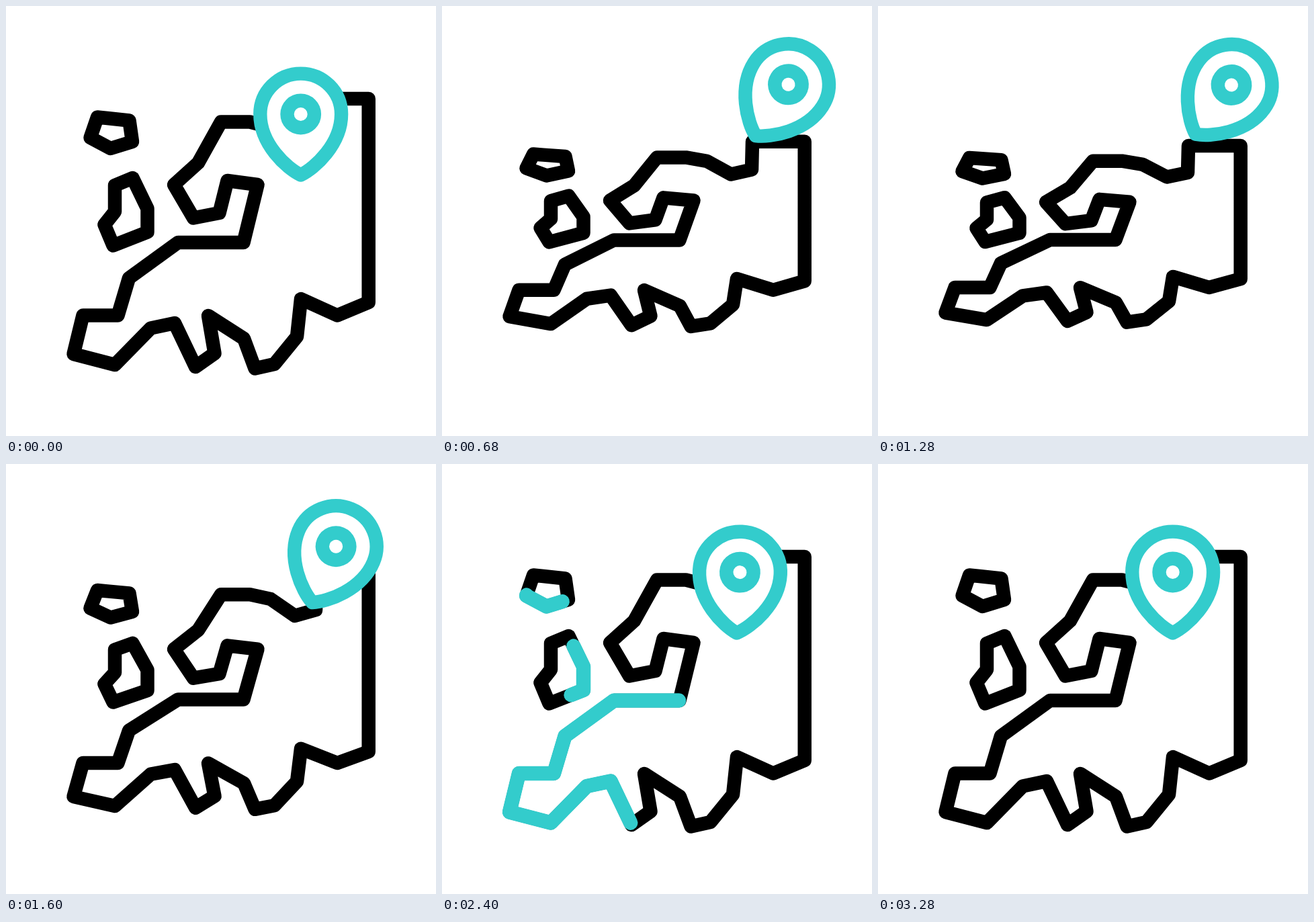
Animation of 640 by 640 pixels, one loop 3600 ms. Source, as an HTML page with a canvas:

```html
<!DOCTYPE html>
<html lang="en">
<head>
<meta charset="utf-8">
<title>Map pin</title>
<style>
  html, body { margin: 0; width: 100%; height: 100%; overflow: hidden; background: #fff; }
  canvas { display: block; width: 640px; height: 640px; }
</style>
</head>
<body>
<canvas id="stage" width="640" height="640"></canvas>
<script>
const ctx = document.getElementById('stage').getContext('2d');
const LOOP = 3600, STEP = 20;
const INK = '#000', TEAL = '#33cccc';
const MID_Y = 340.5;
const TIP = { x: 438.7, y: 251.5 };
const LEAN = 36.4, SETTLE_LEAN = 7.1;

// Corners of the outlines, clockwise from where each trail starts.
const mainland = [
  [430, 209], [461, 199], [462, 138], [539.7, 138], [539.7, 441], [493, 460.5], [439, 436],
  [433, 492], [399.5, 533], [370.5, 539.5], [354, 495], [301, 461], [310.5, 517],
  [282, 537], [251, 472], [215.5, 479.5], [162, 534], [100.5, 518], [114.5, 460.5],
  [166.5, 460.5], [183, 405], [256, 352], [353.5, 352], [374.5, 266], [329.5, 260],
  [317.5, 308], [279, 315.5], [250, 266], [286, 233.5], [320, 172.5], [363, 172.5],
  [394, 180.5]
];
const northIsle = [[151, 167], [183.5, 170.5], [188, 202], [155.5, 212], [125.5, 196], [136, 165.5]];
const southIsle = [[146.5, 325.5], [162, 306], [162, 267], [188.5, 256], [210.5, 301.5], [210.5, 336.5], [159.5, 356.5]];

const mix = (a, b, p) => a + (b - a) * p;
const phase = (t, from, to) => Math.min(1, Math.max(0, (t - from) / (to - from)));
const smooth = p => p * p * (3 - 2 * p);
const easeOut = p => p * (2 - p);

// Cubic bezier easing (x1, 0, x2, 1), solved by bisection.
function bezier(x1, x2, p) {
  let lo = 0, hi = 1;
  for (let i = 0; i < 30; i++) {
    const u = (lo + hi) / 2, v = 1 - u;
    if (3 * u * v * (v * x1 + u * x2) + u ** 3 < p) lo = u; else hi = u;
  }
  return smooth(lo);
}
const snap = p => bezier(0.333, 0.067, p);

// Sides of a closed outline with their lengths.
const sides = points => points.map((a, i) => {
  const b = points[(i + 1) % points.length];
  return { a, b, len: Math.hypot(b[0] - a[0], b[1] - a[1]) };
});

// Part of a closed outline between two fractions of its length.
function trim(points, from, to) {
  const list = sides(points);
  const total = list.reduce((sum, side) => sum + side.len, 0);
  const part = [];
  let pos = 0;
  for (const { a, b, len } of list) {
    const start = Math.max(from * total, pos), end = Math.min(to * total, pos + len);
    const at = d => a.map((v, k) => mix(v, b[k], (d - pos) / len));
    if (end > start) part.push(at(start), at(end));
    pos += len;
  }
  return part;
}

function strokeLine(points, { scale = 1, color = TEAL, width = 21.5, closed = false } = {}) {
  ctx.beginPath();
  for (const [x, y] of points) ctx.lineTo(x, MID_Y + (y - MID_Y) * scale);
  if (closed) ctx.closePath();
  ctx.strokeStyle = color;
  ctx.lineWidth = width;
  ctx.stroke();
}

function drawTrail(points, tail, head, scale) {
  if (head - tail > 0.001) strokeLine(trim(points, tail, head), { scale });
}

function drawTrails(t, scale) {
  // The mainland trail starts and ends out of sight behind the pin.
  const span = p => mix(0.034, 0.985, p);
  drawTrail(mainland, span(phase(t, 1896, 3040)), span(easeOut(phase(t, 1763, 3040))), scale);
  for (const isle of [northIsle, southIsle]) {
    drawTrail(isle, phase(t, 2010, 2960), phase(t, 1910, 2570), scale);
  }
}

function drawSparks(t) {
  const near = 42 * phase(t, 1930, 2130), far = 42 * phase(t, 1900, 2065);
  if (far - near < 0.5) return;
  for (const side of [-1, 1]) {
    const at = d => [439.2 + side * (15 + d * 0.82), 268 + d * 0.57];
    strokeLine([at(near), at(far)]);
  }
}

function pinPose(t) {
  const rising = t < 1200;
  const rise = snap(phase(t, 0, 1200));
  const along = rising ? rise : 1 - phase(t, 1200, 1900) ** 2;
  const arc = 0.58 * along + 0.42 * along ** 3.5;
  const swing = bezier(0.5, 0.5, phase(t, 1200, 2030));
  const settle = 1 - smooth(phase(t, 2030, 2700));
  const lean = rising ? LEAN * rise : mix(LEAN, SETTLE_LEAN * settle, swing);
  return {
    x: TIP.x + 35 * arc,
    y: TIP.y - 60.8 * easeOut(arc),
    angle: lean * Math.PI / 180
  };
}

function drawPin({ x, y, angle }) {
  const r = 60.4, cy = -90.5;
  ctx.save();
  ctx.translate(x, y);
  ctx.rotate(angle);
  ctx.beginPath();
  ctx.moveTo(0, 0);
  ctx.bezierCurveTo(-21, -10, -r, -46, -r, cy);
  ctx.arc(0, cy, r, Math.PI, 0);
  ctx.bezierCurveTo(r, -46, 21, -10, 0, 0);
  ctx.closePath();
  ctx.fillStyle = '#fff';
  ctx.fill();
  ctx.strokeStyle = TEAL;
  ctx.lineWidth = 20.4;
  ctx.stroke();
  ctx.beginPath();
  ctx.arc(0, cy, 20.2, 0, Math.PI * 2);
  ctx.stroke();
  ctx.restore();
}

function draw(t) {
  const squash = snap(phase(t, 0, 1200)) - snap(phase(t, 1200, 2400));
  const scale = 1 - 0.352 * squash;
  ctx.fillStyle = '#fff';
  ctx.fillRect(0, 0, 640, 640);
  ctx.lineCap = ctx.lineJoin = 'round';
  for (const shape of [mainland, northIsle, southIsle]) {
    strokeLine(shape, { scale, color: INK, width: 20.5, closed: true });
  }
  drawTrails(t, scale);
  drawSparks(t);
  drawPin(pinPose(t));
}

function tick() {
  const t = performance.now() % LOOP;
  draw(Math.floor(t / STEP) * STEP);
  requestAnimationFrame(tick);
}
tick();
</script>
</body>
</html>
```
